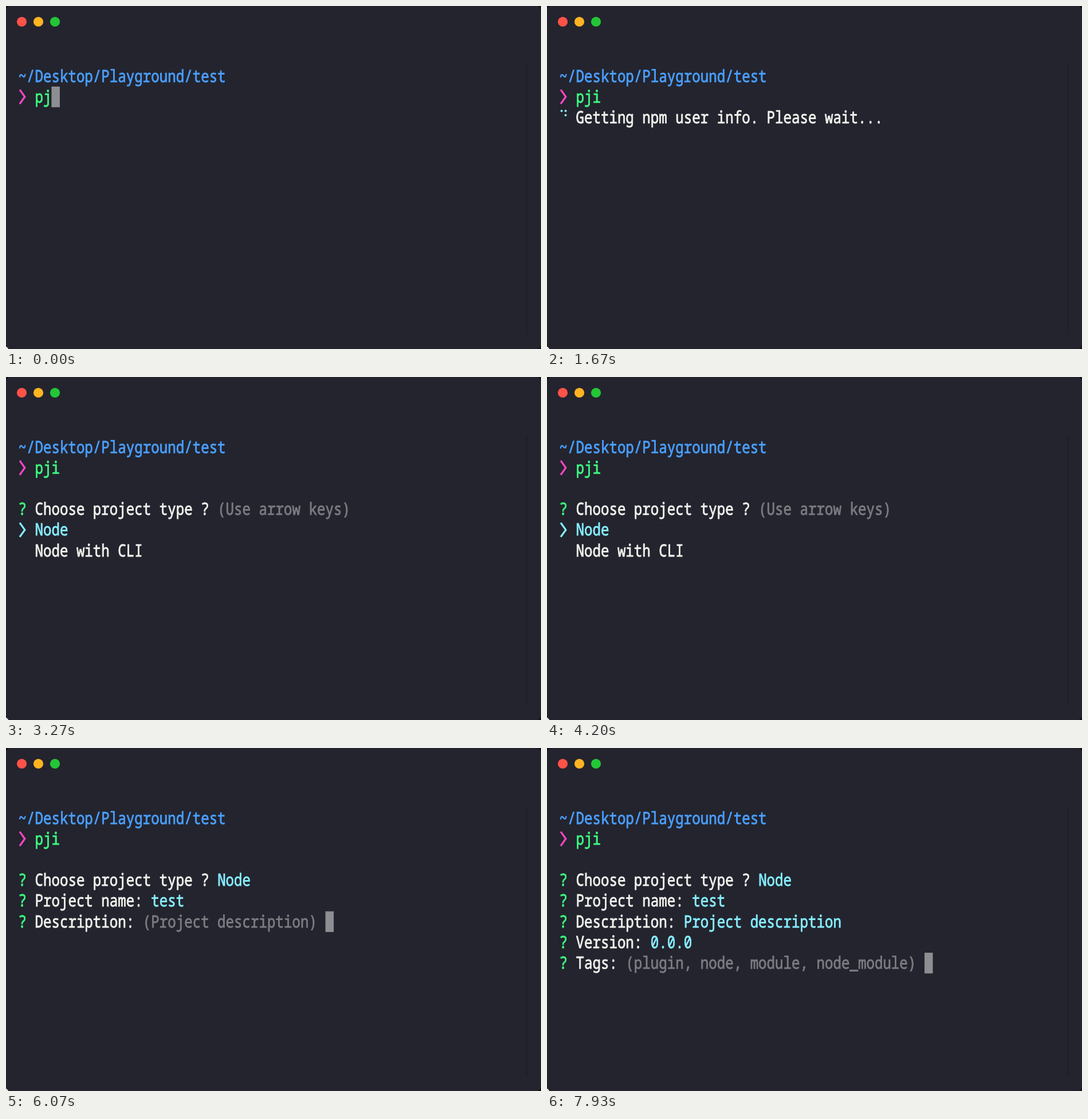
Animation of 934 by 600 pixels, one loop 8000 ms. Source, as an HTML page:

```html
<!DOCTYPE html>
<html lang="en">
<head>
<meta charset="utf-8">
<title>Project setup in a terminal</title>
<style>
  html, body { margin: 0; width: 100%; height: 100%; overflow: hidden; background: #0f1016; }
  svg { display: block; width: 934px; height: 600px; }
  text {
    font: 500 24.15px "Noto Sans Mono", "DejaVu Sans Mono", monospace;
    font-variant-ligatures: none;
    text-rendering: geometricPrecision;
    white-space: pre;
    color: #f1f1ec;
    fill: currentColor;
    stroke: currentColor;
    stroke-width: .75;
  }
  tspan { fill: currentColor; stroke: currentColor; }
  .blue { color: #4a9fff; }
  .green { color: #3dfb7f; }
  .cyan { color: #86eeff; }
  .gray { color: #7b7b80; }
  .cursor { fill: #8e8d92; }
  .chevron { fill: none; stroke-width: 3.2; }
</style>
</head>
<body>
<svg viewBox="0 0 934 600">
  <rect y="596" width="4" height="4" fill="#e8e8e8"/>
  <rect width="934" height="600" rx="8" fill="#23242e"/>
  <rect x="908" y="102" width="3" height="472" fill="#1f2029"/>
  <circle cx="27.5" cy="27.5" r="8.6" fill="#ff5249"/>
  <circle cx="56.5" cy="27.5" r="8.6" fill="#ffb422"/>
  <circle cx="85.5" cy="27.5" r="8.6" fill="#24c637"/>
  <g id="screen"></g>
</svg>
<script>
const LOOP = 8000;
const LEFT = 21.5, TOP = 104.7, COL = 14.49, ROW = 36.2;
const TALL = 1.22; // the terminal face is taller than the installed one

// Moments of the session, in ms
const KEY_I = 130, ENTER = 400, WAIT = 680, TYPE = 2950;
const NAME = 4600, ABOUT = 5550, VERSION = 6450, TAGS = 7350;

const screen = document.getElementById('screen');
const rowTop = row => TOP + row * ROW;
const paint = (color, text) => `<tspan class="${color}">${text}</tspan>`;
const line = (row, markup) =>
  `<text transform="scale(1 ${TALL})" x="${LEFT}" y="${(rowTop(row) + 28) / TALL}">${markup}</text>`;
const cursor = (row, col) =>
  `<rect class="cursor" x="${LEFT + col * COL}" y="${rowTop(row)}" width="${COL}" height="${ROW}"/>`;
const chevron = (row, color) =>
  `<path class="chevron" stroke="${color}" d="M24 ${rowTop(row) + 5.5}l8.8 12.4l-8.8 12.4"/>`;

// Braille spinner: each frame lists its dots as column + row * 2
const SPIN_STEP = 85;
const SPIN = ['012', '013', '0135', '135', '1345', '345', '245', '0245', '024', '0124'];

function spinner(time) {
  const frame = SPIN[Math.floor((time - WAIT) / SPIN_STEP) % SPIN.length];
  const color = time < 1730 ? '#86eeff' : '#48b4fa';
  return [...frame].map(dot =>
    `<circle cx="${25.5 + dot % 2 * 7}" cy="${183.5 + (dot >> 1) * 7.5}" r="2" fill="${color}"/>`).join('');
}

function question(row, label, answer, start, end, time) {
  if (time < start) return '';
  const open = time < end;
  const prompt = paint('green', '?') + ` ${label} `;
  if (!open) return line(row, prompt + paint('cyan', answer));
  return line(row, prompt + paint('gray', `(${answer})`)) +
    cursor(row, label.length + answer.length + 6);
}

function projectType(time) {
  if (time < TYPE) return '';
  const prompt = paint('green', '?') + ' Choose project type ? ';
  if (time >= NAME) return line(3, prompt + paint('cyan', 'Node'));
  return line(3, prompt + paint('gray', '(Use arrow keys)')) +
    chevron(4, '#86eeff') + line(4, paint('cyan', '  Node')) +
    line(5, '  Node with CLI');
}

function draw(time) {
  const command = time < KEY_I ? 'pj' : 'pji';
  let out = line(0, paint('blue', '~/Desktop/Playground/test')) +
    chevron(1, '#ff47c4') + line(1, paint('green', '  ' + command));
  if (time < ENTER) out += cursor(1, 2 + command.length);
  else if (time < WAIT) out += cursor(2, 0);
  else if (time < TYPE) out += spinner(time) + line(2, '  Getting npm user info. Please wait...');
  return out + projectType(time) +
    question(4, 'Project name:', 'test', NAME, ABOUT, time) +
    question(5, 'Description:', 'Project description', ABOUT, VERSION, time) +
    question(6, 'Version:', '0.0.0', VERSION, TAGS, time) +
    question(7, 'Tags:', 'plugin, node, module, node_module', TAGS, LOOP, time);
}

const start = performance.now();
let shown = '';

function tick() {
  const markup = draw((performance.now() - start) % LOOP);
  if (markup !== shown) screen.innerHTML = shown = markup;
  requestAnimationFrame(tick);
}
tick();
</script>
</body>
</html>
```
